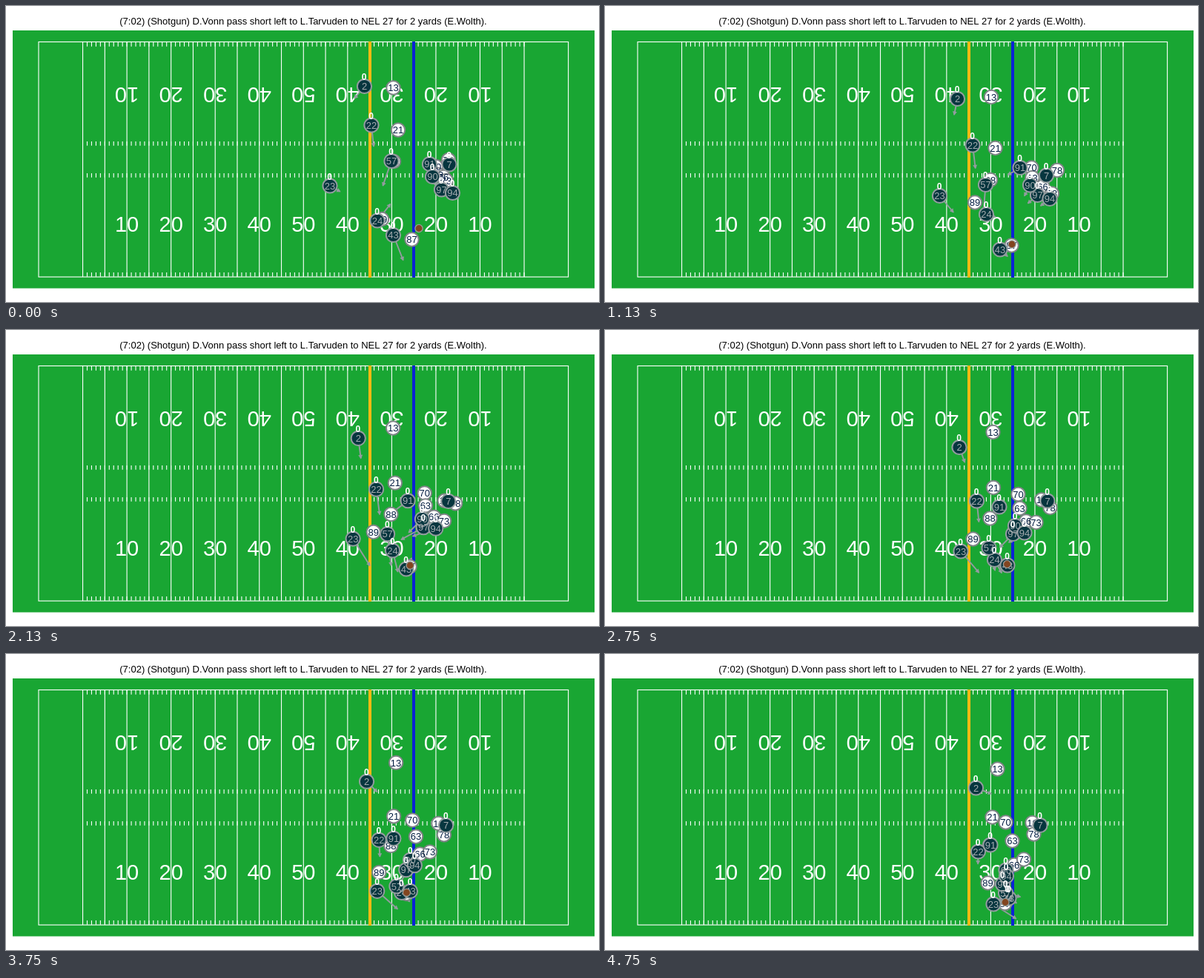
Recreate the animation shown at these times as an HTML page with a canvas. Size 800 by 400 pixels, loop 4.88 s.

```html
<!DOCTYPE html>
<html lang="en">
<head>
<meta charset="utf-8">
<title>Play tracking</title>
<style>
html, body { margin: 0; width: 100%; height: 100%; overflow: hidden; background: #fff; }
canvas { display: block; width: 800px; height: 400px; }
</style>
</head>
<body>
<canvas id="stage" width="800" height="400"></canvas>
<script>
const ctx = document.getElementById('stage').getContext('2d');
const FONT = '"Liberation Sans", Arial, sans-serif';
const LOOP = 4880, STEP = 125;
const TITLE = '(7:02) (Shotgun) D.Vonn pass short left to L.Tarvuden to NEL 27 for 2 yards (E.Wolth).';
const GREY = '#939c9f';
const LEFT = 44, TOP = 48.5, WIDE = 714.6, HIGH = 317.6;

// Steps of the start, the catch, the turn and the tackle
const KEYS = [0, 9, 22, 38];

// Smooth curve through four values, returning place and speed per step
function curve(v) {
  const h = [0, 1, 2].map(i => KEYS[i + 1] - KEYS[i]);
  const s = h.map((len, i) => (v[i + 1] - v[i]) / len);
  const inner = i => (s[i - 1] * h[i] + s[i] * h[i - 1]) / (h[i - 1] + h[i]);
  const m1 = inner(1), m2 = inner(2);
  const m = [2 * s[0] - m1, m1, m2, 2 * s[2] - m2];
  return n => {
    const i = n < KEYS[1] ? 0 : n < KEYS[2] ? 1 : 2;
    const u = (n - KEYS[i]) / h[i], w = 1 - u;
    return {
      at: v[i] * w * w * (1 + 2 * u) + v[i + 1] * u * u * (3 - 2 * u) +
          h[i] * u * w * (m[i] * w - m[i + 1] * u),
      speed: 6 * u * w * s[i] + m[i] * w * (1 - 3 * u) + m[i + 1] * u * (3 * u - 2)
    };
  };
}

function player(num, ...points) {
  const cx = curve(points.map(p => p[0])), cy = curve(points.map(p => p[1]));
  return n => {
    const x = cx(n), y = cy(n);
    return { num, x: x.at, y: y.at, vx: x.speed, vy: y.speed };
  };
}

const receiver = player(87, [547.5, 315.5], [548.5, 323.5], [542, 318], [539.5, 337]);
const offense = [
  player(13, [522.5, 110.5], [521, 123], [523.5, 138], [529.5, 155.5]),
  player(21, [529, 167.5], [526.5, 192], [524, 213], [522.5, 220.5]),
  player(88, [523, 210], [520, 235], [519.5, 254.5], [519, 258]),
  player(89, [507, 288], [499, 265.5], [496.5, 282.5], [516.5, 309.5]),
  player(10, [597, 212], [595, 229], [589, 229.5], [576.5, 228]),
  player(70, [580, 217], [575.5, 218.5], [557.5, 222], [540.5, 227.5]),
  player(63, [583, 228], [576.5, 232], [559.5, 241], [549.5, 252.5]),
  player(66, [590, 231], [590.5, 244], [568, 258.5], [552, 285]),
  player(73, [594, 236], [603, 253.5], [581.5, 260], [565, 277.5]),
  player(78, [597, 208], [610, 222], [600.5, 240], [578.5, 243.5]),
  receiver
];
const defense = [
  player(2, [483.5, 108.5], [475.5, 125.5], [478, 158.5], [500.5, 181]),
  player(22, [493, 161], [496, 188], [501.5, 231], [503.5, 267]),
  player(23, [437, 243], [451.5, 256.5], [480, 299], [524, 338]),
  player(24, [501, 290], [514.5, 281.5], [525.5, 310.5], [543, 330]),
  player(43, [522.5, 309.5], [533, 329], [543, 318], [545, 330]),
  player(57, [520, 209.5], [513.5, 241.5], [518, 294.5], [540.5, 323]),
  player(91, [571.5, 213.5], [560, 218.5], [532, 239], [520, 258]),
  player(97, [587.5, 248], [583.5, 255.5], [550.5, 275.5], [536.5, 311]),
  player(90, [575.5, 230.5], [573.5, 242], [553.5, 264.5], [541, 292]),
  player(94, [602.5, 252.5], [600, 260.5], [566, 274], [541.5, 300]),
  player(7, [598, 214], [595.5, 229], [597, 231], [587, 231.5])
];

// Flies in until the catch at step 4, then stays with the receiver
function ball(n) {
  const p = receiver(n), left = Math.max(0, 1 - n / 4);
  return { x: p.x + 0.5 + 9 * left, y: p.y - 1.5 - 13.5 * left };
}

const yard = n => LEFT + n * WIDE / 120;

function line(x1, y1, x2, y2, color, width) {
  ctx.strokeStyle = color;
  ctx.lineWidth = width;
  ctx.beginPath();
  ctx.moveTo(x1, y1);
  ctx.lineTo(x2, y2);
  ctx.stroke();
}

function label(str, x, y, size, color, weight = '') {
  ctx.font = `${weight} ${size}px ${FONT}`;
  ctx.textAlign = 'center';
  ctx.fillStyle = color;
  ctx.fillText(str, x, y);
}

function dot(x, y, r, fill, stroke, width) {
  ctx.beginPath();
  ctx.arc(x, y, r, 0, Math.PI * 2);
  ctx.fillStyle = fill;
  ctx.fill();
  ctx.strokeStyle = stroke;
  ctx.lineWidth = width;
  ctx.stroke();
}

function marker(n, color) {
  ctx.fillStyle = color;
  ctx.fillRect(Math.round(yard(n)) - 2, 48, 4, 319);
}

function drawField() {
  ctx.fillStyle = '#fff';
  ctx.fillRect(0, 0, 800, 400);
  ctx.fillStyle = '#19a633';
  ctx.fillRect(9, 33, 785, 348.5);
  label(TITLE, 401, 24.5, 13, '#000');

  const bottom = TOP + HIGH;
  ctx.strokeStyle = '#fff';
  ctx.lineWidth = 1.1;
  ctx.strokeRect(LEFT, TOP, WIDE, HIGH);
  for (let n = 10; n <= 110; n += 5) line(yard(n), TOP, yard(n), bottom, '#fff', 1.1);
  for (let n = 11; n <= 110; n++) {
    for (const y of [49, 183, 226, bottom - 6]) line(yard(n), y, yard(n), y + 5.7, '#fff', 1.1);
  }
  for (let n = 20; n <= 100; n += 10) {
    const num = 50 - Math.abs(60 - n);
    label(num, yard(n), 305, 29, '#fff');
    ctx.save();
    ctx.translate(yard(n), 110);
    ctx.rotate(Math.PI);
    label(num, 0, 0, 29, '#fff');
    ctx.restore();
  }
  marker(75, '#fcba12');
  marker(85, '#0b22d6');
}

// Points to where the player would be ten steps later
function arrow({ x, y, vx, vy }) {
  const tx = x + vx * 10, ty = y + vy * 10;
  line(x, y, tx, ty, GREY, 1.9);
  ctx.save();
  ctx.translate(tx, ty);
  ctx.rotate(Math.atan2(vy, vx));
  ctx.fillStyle = GREY;
  ctx.beginPath();
  ctx.moveTo(1, 0);
  ctx.lineTo(-4.5, -3);
  ctx.lineTo(-4.5, 3);
  ctx.fill();
  ctx.restore();
}

function drawTeam(spots, fill, ring, ink, r) {
  for (const p of spots) dot(p.x, p.y, r, fill, ring, 2);
  for (const p of spots) label(p.num, p.x, p.y + 4.7, 13, ink);
}

function draw(n) {
  const spots = defense.map(at => at(n));
  drawField();
  spots.forEach(arrow);
  drawTeam(offense.map(at => at(n)), '#fff', '#7f8487', '#041e42', 9.2);
  drawTeam(spots, '#07363f', GREY, '#a5acaf', 9.6);
  for (const p of spots) label('0', p.x - 0.3, p.y - 8.3, 12, '#fff', 'bold');
  const b = ball(n);
  dot(b.x, b.y, 5.1, '#824520', '#959a96', 1.4);
}

function tick(now) {
  const t = Math.floor((now % LOOP) / 10) * 10;
  draw(Math.floor(t / STEP));
  requestAnimationFrame(tick);
}
draw(0);
requestAnimationFrame(tick);
</script>
</body>
</html>
```
